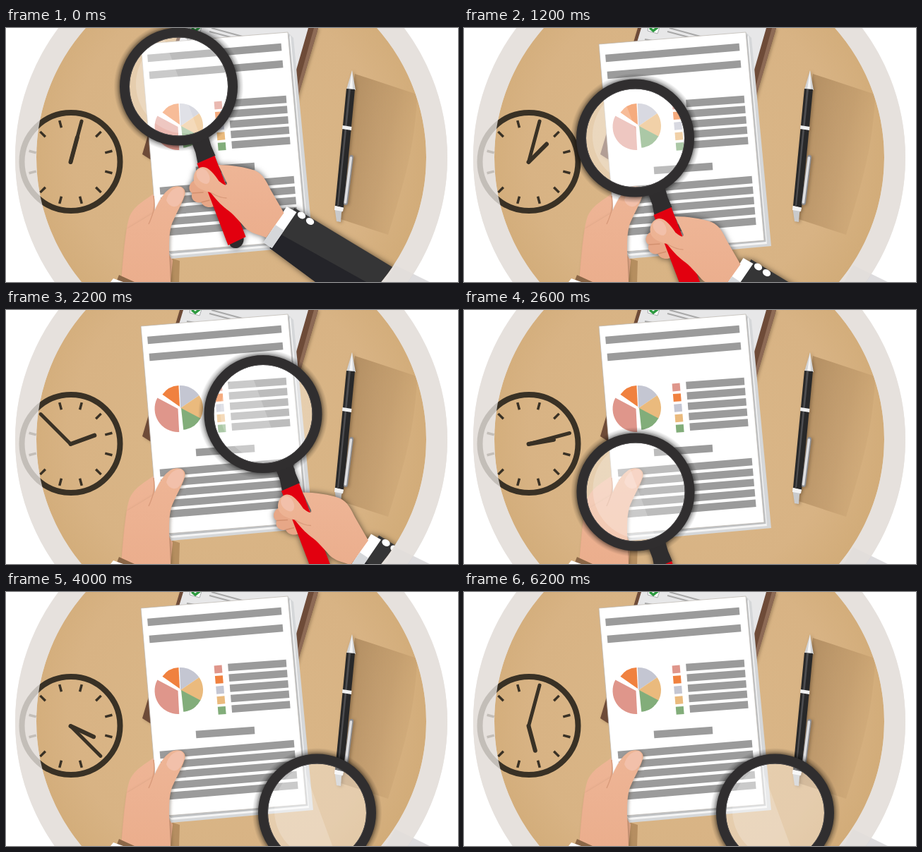
Animation, 640 px wide and 360 px high, one loop 6400 ms. Source, as an HTML page:

```html
<!DOCTYPE html>
<html lang="en">
<head>
<meta charset="utf-8">
<title>Document review</title>
<style>
html, body { margin: 0; width: 100%; height: 100%; overflow: hidden; background: #fff; }
svg { display: block; width: 100vw; height: 100vh; }
.soft { filter: drop-shadow(0 0 4px rgba(0, 0, 0, .6)); }
.faint { filter: drop-shadow(2px 1px 2px rgba(60, 40, 20, .35)); }
</style>
</head>
<body>
<svg viewBox="0 0 640 360" xmlns="http://www.w3.org/2000/svg">
  <defs>
    <clipPath id="disk"><circle cx="319" cy="183.500" r="276"/></clipPath>
    <radialGradient id="wood" gradientUnits="userSpaceOnUse" cx="310" cy="170" r="290">
      <stop offset="0" stop-color="#dab788"/>
      <stop offset=".75" stop-color="#d8b384"/>
      <stop offset="1" stop-color="#d2ac79"/>
    </radialGradient>
    <linearGradient id="fade" gradientUnits="userSpaceOnUse" x1="480" y1="170" x2="572" y2="190">
      <stop offset="0" stop-color="#a17d52" stop-opacity=".62"/>
      <stop offset=".6" stop-color="#ab8558" stop-opacity=".4"/>
      <stop offset="1" stop-color="#b38c5d" stop-opacity=".12"/>
    </linearGradient>
    <linearGradient id="skin" x1="0" y1="0" x2="0" y2="1">
      <stop offset="0" stop-color="#eeb596"/>
      <stop offset="1" stop-color="#ebae8d"/>
    </linearGradient>
    <radialGradient id="halo" gradientUnits="userSpaceOnUse" cx="0" cy="0" r="92">
      <stop offset=".88" stop-color="#000" stop-opacity="0"/>
      <stop offset=".9" stop-color="#000" stop-opacity=".5"/>
      <stop offset=".95" stop-color="#000" stop-opacity=".18"/>
      <stop offset="1" stop-color="#000" stop-opacity="0"/>
    </radialGradient>
  </defs>

  <circle cx="319" cy="184" r="306" fill="#e6e2de"/>
  <path d="M551 336 600 360H538Z" fill="#cfcdd0" opacity=".7"/>
  <circle cx="319" cy="183.500" r="276" fill="url(#wood)"/>

  <g clip-path="url(#disk)">
    <!-- clipboard -->
    <path class="faint" d="M246 0H442L380 210 204 186 193 179Z" fill="#6e4b38"/>
    <path d="M436 0H442L414 96 411 90Z" fill="#8d6a55"/>
    <path d="M251 0H428L385 150 206 150Z" fill="#e7e7e8"/>
    <path d="M262 -8 278 -4 274 8 260 4Z" fill="#fff" stroke="#a9abad"/>
    <path d="M263 0 268 4 278 -4" fill="none" stroke="#2c9a3f" stroke-width="3.500"/>
    <path d="M291 0 342 14M288 5 318 13M256 16 280 20" stroke="#a8a8a8" stroke-width="2"/>

    <!-- pen -->
    <path d="M494 65 582 94 C580 170 560 230 541 293L474 271Z" fill="url(#fade)"/>
    <g class="faint">
      <path d="M490 60 495 88 482 87Z" fill="#d3d4d6"/>
      <path d="M490 60 491 88 486 87Z" fill="#f5f5f5"/>
      <path d="M482 86 494 87 478 255 466 252Z" fill="#282829"/>
      <path d="M485 87 488 87 471 252 469 252Z" fill="#4d4d50"/>
      <path d="M476.500 138 489.500 140 489 145 476 143Z" fill="#f1f1f1"/>
      <path d="M489 183 481 248" stroke="#8d8d90" stroke-width="6" stroke-linecap="round"/>
      <path d="M488.500 184 480.500 247" stroke="#dedee0" stroke-width="3.500" stroke-linecap="round"/>
      <path d="M466 252 478 255 475 262 474 275 468 274 466 260Z" fill="#c9cacc"/>
      <path d="M465.500 252 478 254.500 477 260 465 258Z" fill="#f3f3f3"/>
    </g>

    <!-- back of the left hand -->
    <path d="M233 326 246 330 245 360H228Z" fill="#ad8557" opacity=".8"/>
    <path d="M163 360C166 320 169 285 175 267 182 251 196 245 210 234L236 330 233 360Z" fill="url(#skin)"/>
  </g>

  <!-- papers -->
  <path d="M399 6 407 14 435 309 234 327 225 310Z" fill="#d5d7d9"/>
  <path d="M403 10 429 306 234 323 225 310Z" fill="#f4f4f4"/>
  <path d="M401 8 427.500 303 233 320 225 310Z" fill="#bfc1c3"/>
  <path d="M191 23 399 6 425 301 216 318Z" fill="#fff" stroke="#b9b4ac" stroke-width=".7"/>
  <g id="page"></g>

  <g clip-path="url(#disk)">
    <!-- left thumb and cuff -->
    <path class="faint" d="M209 262C216 246 224 230 237 225 247 222 256 227 253 237 249 250 239 266 234 280 231 292 231 302 231 318L233 360H163C166 330 168 305 171 285Z" fill="url(#skin)"/>
    <path d="M209 238C211 252 210 260 202 278" fill="none" stroke="#d99b7b" stroke-width="1.500"/>
    <path d="M227 244C230 231 241 224 248 226 255 231 252 244 243 252 237 255 230 252 227 244Z" fill="#f2c0aa"/>
    <path d="M160 350 182 360H156Z" fill="#8b6747"/>
    <path d="M152 355 166 360H148Z" fill="#fff"/>
  </g>

  <g id="clock" fill="none" stroke="#393125"></g>
  <g clip-path="url(#disk)" stroke="#393125" stroke-linecap="round">
    <path id="hour" stroke-width="6"/>
    <path id="minute" stroke-width="5"/>
    <circle cx="91.500" cy="190" r="2" fill="#393125"/>
  </g>
  <circle cx="319" cy="183.500" r="291" fill="none" stroke="#e6e2de" stroke-width="30" opacity=".8"/>

  <g clip-path="url(#disk)">
    <g id="glass">
      <circle r="71" fill="#fff" opacity=".33"/>
      <path d="M-20 -67A70 70 0 0 0 28 64Z" fill="#fff" opacity=".2"/>
      <circle r="92" fill="url(#halo)"/>
      <g class="soft">
        <!-- fingers behind the handle -->
        <path d="M25 132C14 135 12 147 19 151 16 160 24 166 32 164 35 171 44 173 52 169L78 160 60 125Z" fill="#e7a787"/>
        <path d="M19 151 35 150M32 164 44 161" stroke="#d3906f" stroke-width="1.300"/>
        <path d="M18 78 41 67 46 84 52 98 27 109 24 94Z" fill="#2f2d2e"/>
        <path d="M72 223 92 214C93 222 88 228 82 229 76 229 73 227 72 223Z" fill="#2d2b2c"/>
        <path d="M26 109 51 98 95 213 70 225Z" fill="#e2000f"/>
        <!-- sleeve -->
        <path d="M164 172 420 327 400 430 129 229Z" fill="#353536"/>
        <path d="M142 208 400 352 400 430 129 229Z" fill="#242429"/>
        <path d="M153 170 167 178 132 229 120 221Z" fill="#fff"/>
        <path d="M137 196 149 204 132 229 120 221Z" fill="#d5d7da"/>
        <g fill="#fff">
          <ellipse rx="6" ry="4.500" transform="translate(174 182.500) rotate(30)"/>
          <ellipse rx="6" ry="4.500" transform="translate(186 191) rotate(30)"/>
        </g>
        <!-- palm and thumb -->
        <path d="M56 111C74 111 94 114 108 119 120 124 125 136 130 146L149 179 124 214C111 209 102 208 94 200 86 191 77 180 68 174 60 168 51 158 45 150 36 148 25 144 22 136 19 126 24 115 34 114 43 114 51 125 57 134 66 141 69 141 68 136Z" fill="url(#skin)"/>
        <path d="M45 150C53 155 60 158 68 158" fill="none" stroke="#d99b7b" stroke-width="1.400"/>
        <path d="M25 123C27 115 35 114 40 120 45 127 46 135 40 138 32 138 25 131 25 123Z" fill="#f2c0aa"/>
      </g>
      <circle r="76.500" fill="none" stroke="#302e2f" stroke-width="14"/>
      <circle r="70" fill="none" stroke="#4a4849"/>
    </g>
  </g>
</svg>
<script>
const $ = id => document.getElementById(id);
const rad = deg => deg * Math.PI / 180;
const polar = (x, y, r, deg) => [x + r * Math.sin(rad(deg)), y - r * Math.cos(rad(deg))];

// Page content
const bar = (x1, y1, x2, y2) =>
  `<path d="M${x1} ${y1}L${x2} ${y2}" stroke="#9b9b9b" stroke-width="10.5"/>`;
const slice = (x, y, r, a, b, fill) =>
  `<path d="M${x} ${y}L${polar(x, y, r, a)}A${r} ${r} 0 0 1 ${polar(x, y, r, b)}Z" fill="${fill}"/>`;
const pink = "#df968b", orange = "#f0813f", grey = "#c4c6d2", tan = "#eaba7d", green = "#82ad7a";

let page = bar(200.5, 43, 390, 27) + bar(203, 67, 392, 51) + bar(269, 202, 352, 196);
[pink, orange, grey, tan, green].forEach((fill, i) => {
  page += bar(314.5 + 1.3 * i, 107 + 14.7 * i, 397 + 1.3 * i, 101 + 14.6 * i);
  page += bar(218 + 1.3 * i, 231 + 14.7 * i, 408 + 1.3 * i, 215 + 14.7 * i);
  page += `<rect x="-5.5" y="-5.5" width="11" height="11" fill="${fill}"
    transform="translate(${300.5 + 1.3 * i} ${109.5 + 14.6 * i}) rotate(-4.7)"/>`;
});
page += slice(247, 139, 32, -2, 56, grey) + slice(247, 139, 32, 56, 118, tan)
  + slice(248, 139, 31, 118, 174, green) + slice(246, 137, 30, -55, -3, orange)
  + slice(243.5, 140, 33, 177, 298, pink);
$("page").innerHTML = page;

// Clock face, turned by half an hour mark
const CX = 91.5, CY = 190, TILT = 15;
let face = `<circle cx="92" cy="189.500" r="69.500" stroke-width="8"/>`;
for (let a = TILT; a < 360; a += 30)
  face += `<path d="M${polar(CX, CY, 50.5, a)}L${polar(CX, CY, 61, a)}" stroke-width="3.500"/>`;
$("clock").innerHTML = face;

const setHand = (id, len, deg) =>
  $(id).setAttribute("d", `M${CX} ${CY}L${polar(CX, CY, len, deg + TILT)}`);

// Lens path: step, x, y
const stops = [
  [0, 244.5, 83], [4, 362, 60], [6, 242.5, 156], [11, 364, 147.5],
  [13, 243, 258], [16, 347, 254.5], [18, 399, 282], [20, 440.5, 313]
];

function lensAt(step) {
  const i = stops.findIndex(s => s[0] > step);
  if (i < 0) return stops[stops.length - 1].slice(1);
  const [a, ax, ay] = stops[i - 1], [b, bx, by] = stops[i];
  const f = (step - a) / (b - a);
  return [ax + (bx - ax) * f, ay + (by - ay) * f];
}

const LOOP = 6400, TICK = 200, HOLD = 20;

function draw(ms) {
  let step = Math.floor((ms % LOOP) / TICK);
  if (step > HOLD) step--; // one step lasts twice as long
  const minutes = step * 10;
  setHand("hour", 36, minutes / 2);
  setHand("minute", 60, minutes * 6);
  $("glass").setAttribute("transform", `translate(${lensAt(step)})`);
}

const start = performance.now();
function loop(now) {
  draw(Math.max(0, now - start));
  requestAnimationFrame(loop);
}
draw(0);
requestAnimationFrame(loop);
</script>
</body>
</html>
```
